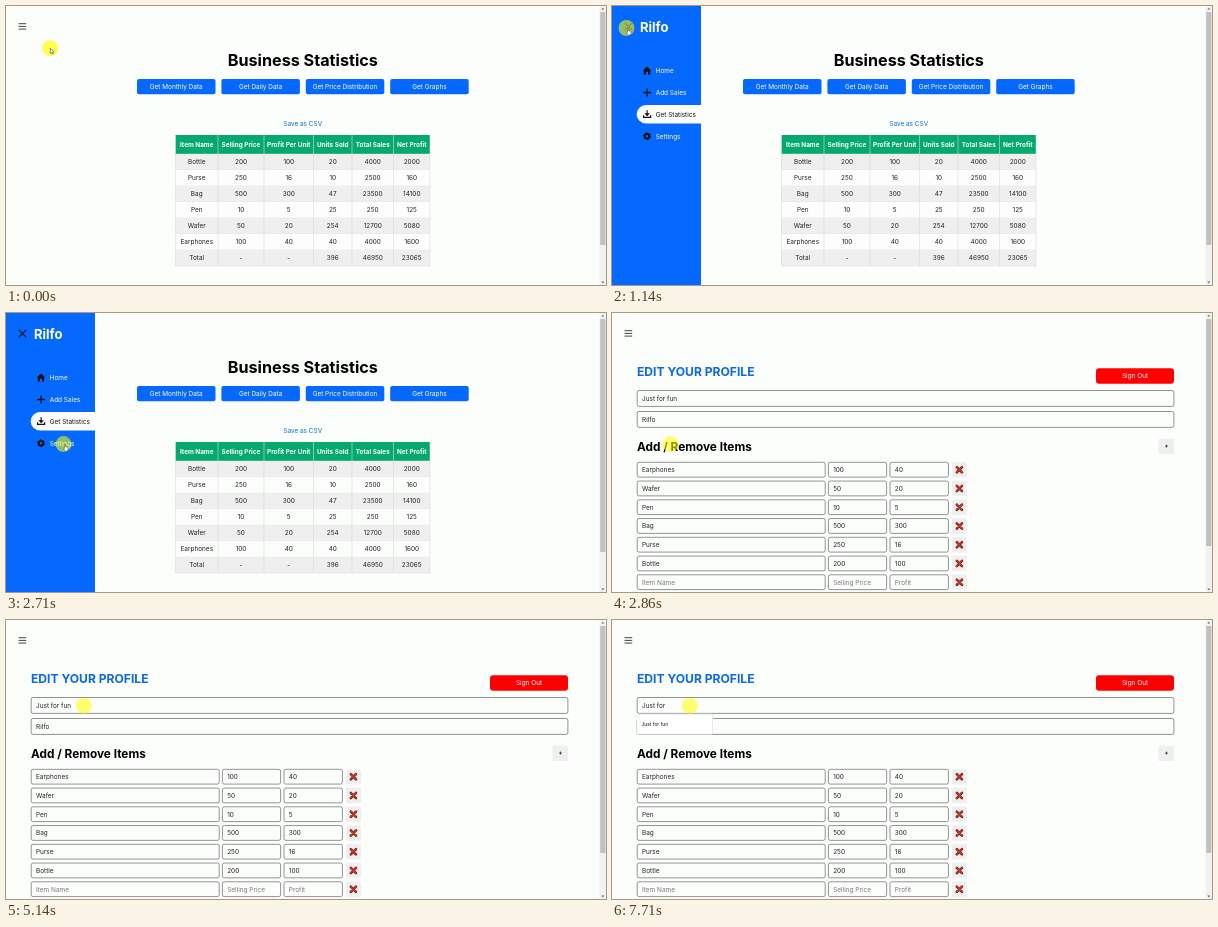
Animation of 600 by 279 pixels, one loop 8000 ms. Source, as an HTML page:

```html
<!DOCTYPE html>
<html lang="en">
<head>
<meta charset="utf-8">
<title>Business statistics</title>
<style>
  html, body { margin: 0; width: 100%; height: 100%; overflow: hidden; background: #fcfefc; }
  svg { display: block; width: 100vw; height: 100vh; }
  text { font: 400 6.4px Inter, "Open Sans", sans-serif; fill: #222; white-space: pre; }
</style>
</head>
<body>
<svg id="stage" viewBox="0 0 600 279"></svg>
<script>
const BLUE = '#0569ff';
const rect = (x, y, w, h, fill, extra = '') =>
  `<rect x="${x}" y="${y}" width="${w}" height="${h}" fill="${fill}" ${extra}/>`;
const path = (d, stroke, width, extra = '') =>
  `<path d="${d}" fill="none" stroke="${stroke}" stroke-width="${width}" ${extra}/>`;
// y is the middle of the capitals
const text = (s, x, y, { size = 6.45, fill = '#222', weight = 400, anchor = 'start', id = '' } = {}) =>
  `<text ${id && `id="${id}"`} x="${x}" y="${y + size * .36}" text-anchor="${anchor}"
    style="font-size:${size}px;fill:${fill};font-weight:${weight}">${s}</text>`;
const mid = (s, x, y, style) => text(s, x, y, { anchor: 'middle', ...style });
const group = (id, body) => `<g id="${id}">${body}</g>`;

const burger = path('M12.5 17.7h7.7M12.5 20.4h7.7M12.5 23.1h7.7', '#333', .9);

function scrollbar(bottom) {
  return rect(593.5, 0, 6.5, 279, '#f1f1f1') + rect(594.2, 6, 5.2, bottom - 6, '#c1c1c1') +
    '<path d="M595.4 3.6l1.4-1.8 1.4 1.8zM595.4 275.6l1.4 1.8 1.4-1.8z" fill="#666"/>';
}

function statsPage() {
  const buttons = ['Get Monthly Data', 'Get Daily Data', 'Get Price Distribution', 'Get Graphs'];
  const edges = [169.5, 212, 258, 307.5, 346, 387.5, 424];
  const rows = [
    'Item Name,Selling Price,Profit Per Unit,Units Sold,Total Sales,Net Profit',
    'Bottle,200,100,20,4000,2000', 'Purse,250,16,10,2500,160', 'Bag,500,300,47,23500,14100',
    'Pen,10,5,25,250,125', 'Wafer,50,20,254,12700,5080', 'Earphones,100,40,40,4000,1600',
    'Total,-,-,396,46950,23065'
  ];
  let out = mid('Business Statistics', 296.8, 54.5, { size: 16.2, weight: 700, fill: '#000' });
  buttons.forEach((label, i) => {
    const x = 131 + i * 84.4;
    out += rect(x, 73, 78.5, 15.2, BLUE, 'rx="2"') + mid(label, x + 39.2, 80.6, { fill: '#fff' });
  });
  out += mid('Save as CSV', 296.7, 118, { fill: '#0a6fd8' });
  rows.forEach((row, r) => {
    const head = r === 0, y = head ? 129 : 132 + r * 16, h = head ? 19 : 16;
    out += rect(169.5, y, 254.5, h, head ? '#04aa6d' : r % 2 ? '#eeefee' : '#fcfefc');
    row.split(',').forEach((cell, c) => {
      out += mid(cell, (edges[c] + edges[c + 1]) / 2, y + h / 2,
        head ? { fill: '#fff', weight: 700, size: 6.4 } : {});
    });
    out += path(`M169.5 ${y + h}H424`, '#d8dad8', .5);
  });
  out += path(edges.map(x => `M${x} 129V260`).join(''), '#d8dad8', .6);
  return out + burger + scrollbar(239);
}

function sidebar() {
  const items = ['Home', 'Add Sales', 'Get Statistics', 'Settings'];
  return rect(0, 0, 89, 279, BLUE) +
    path('M12.8 16.8l7.4 7.4m0-7.4l-7.4 7.4', '#111', 1.1) +
    text('Rilfo', 28, 21, { size: 13, weight: 700, fill: '#fff' }) +
    '<path d="M89 99H34a9.2 9.2 0 0 0 0 18.5H89z" fill="#fcfefc"/>' +
    items.map((s, i) => text(s, 43.7, 64.6 + i * 21.9, { fill: i === 2 ? '#111' : '#fff' })).join('') +
    '<path d="M35 60.6l4.2 4h-1v3.8h-2.2v-2.6h-2v2.6h-2.2v-3.8h-1z" fill="#111"/>' +
    path('M31.2 86.5h7.8M35.1 82.6v7.8', '#111', 1.3) +
    path('M35.1 104.2v5M31.6 109.2v2.2h7v-2.2', '#111', 1.2) +
    '<path d="M32.3 107.3h5.6l-2.8 3z" fill="#111"/>' +
    '<circle cx="35" cy="130.2" r="2.3" fill="none" stroke="#111" stroke-width="2"/>' +
    '<circle cx="35" cy="130.2" r="3.5" fill="none" stroke="#111" stroke-width="1" stroke-dasharray="1.83"/>';
}

function profilePage() {
  const field = (x, y, w, h, s, fill, id) =>
    rect(x, y, w, h, '#fcfefc', 'rx="1.8" stroke="#666" stroke-width=".7"') + text(s, x + 4.8, y + h / 2, { fill, id });
  const items = ['Earphones,100,40', 'Wafer,50,20', 'Pen,10,5', 'Bag,500,300',
    'Purse,250,16', 'Bottle,200,100', 'Item Name,Selling Price,Profit'];
  const columns = [[25.2, 188], [216.4, 58.2], [278, 58.4]];
  let out = rect(0, 0, 600, 279, '#fcfefc') +
    text('EDIT YOUR PROFILE', 25, 58.6, { size: 12.1, weight: 700, fill: '#0a69e6' }) +
    rect(484, 55.2, 78, 15.6, '#f00', 'rx="3"') + mid('Sign Out', 523, 63, { fill: '#fff' }) +
    field(25.2, 77.5, 536.7, 15.9, '', '#222', 'fun') + field(25.2, 98.5, 536.7, 15.9, 'Rilfo') +
    text('Add / Remove Items', 25, 134, { size: 11.8, weight: 700, fill: '#000' }) +
    rect(546.5, 125.4, 15.5, 15.5, '#eeefee', 'rx="1.5"') + path('M553 133.1h3M554.5 131.6v3', '#222', .7);
  items.forEach((item, r) => {
    const y = 149.3 + r * 18.75;
    item.split(',').forEach((s, c) => {
      const [x, w] = columns[c];
      out += field(x, y, w, 14.8, s, r === 6 ? '#777' : '#222');
    });
    const cross = `M344.8 ${y + 4.8}l5.2 5.2m0-5.2l-5.2 5.2`;
    out += rect(340, y - .3, 15, 15.4, '#eeefee', 'rx="1.5"') +
      path(cross, '#5a1c10', 2.5, 'stroke-linecap="round"') +
      path(cross, '#cf3a20', 1.4, 'stroke-linecap="round"');
  });
  return out + group('hint', rect(25, 94, 75.5, 20.2, '#fff', 'stroke="#ddd" stroke-width=".6"') +
    text('Just for fun', 29.6, 104, { size: 4.8, weight: 500, fill: '#333' })) +
    rect(0, 80.8, .7, 9, '#222', 'id="caret"') + burger + scrollbar(233);
}

const stage = document.getElementById('stage');
stage.innerHTML = rect(0, 0, 600, 279, '#fcfefc') + group('stats', statsPage()) +
  group('menu', sidebar()) + group('profile', profilePage()) +
  group('pointer', '<circle id="halo" r="8" fill="#ff0"/>' +
    '<path id="arrow" d="M.2 0v5.2l1.2-1 .8 1.8.9-.4-.8-1.7h1.6z" fill="#fff" stroke="#234" stroke-width=".5"/>' +
    '<path id="hand" d="M1 0q.8-.3 1 .5v2.2l2 .5q.7.3.5 1.2L4 7H1.6L0 4.6q.2-.7 1-.3z" fill="#fff" stroke="#222" stroke-width=".4"/>');
const el = id => document.getElementById(id);
const show = (id, on) => { el(id).style.display = on ? '' : 'none'; };

// pointer stops: start, end, x, y
const moves = [[0, 858, 14.5, 22], [1142, 2143, 49.5, 130.3], [2143, 2858, 58.5, 131.2],
  [3000, 4143, 100.5, 185], [4143, 5143, 77.8, 85.8]];

function pointerAt(t) {
  let x = 44.2, y = 42.2;
  for (const [start, end, tx, ty] of moves) {
    const p = Math.min(1, Math.max(0, (t - start) / (end - start)));
    const e = p * p * (3 - 2 * p);
    x += (tx - x) * e;
    y += (ty - y) * e;
  }
  return [x, y];
}

function draw() {
  const t = Math.floor(performance.now() % 8000 * .007 + .05) / .007 + 1;
  const onProfile = t > 2850;
  const [x, y] = pointerAt(t - 1);
  show('stats', !onProfile);
  show('menu', t > 1140 && !onProfile);
  show('profile', onProfile);
  show('hint', t > 6710);
  const cut = [6710, 6855, 7000].filter(at => t > at).length;
  el('fun').textContent = 'Just for fun'.slice(0, 12 - cut);
  show('caret', t > 5855 && t < 6140 || t > 6710 && t < 7570);
  el('caret').setAttribute('x', [65.5, 61.8, 58, 55.8][cut]);
  el('pointer').setAttribute('transform', `translate(${x} ${y})`);
  el('halo').setAttribute('fill-opacity', t < 1140 ? .68 : .56);
  show('arrow', t < 700);
  show('hand', t >= 700 && !onProfile);
  requestAnimationFrame(draw);
}
draw();
</script>
</body>
</html>
```
